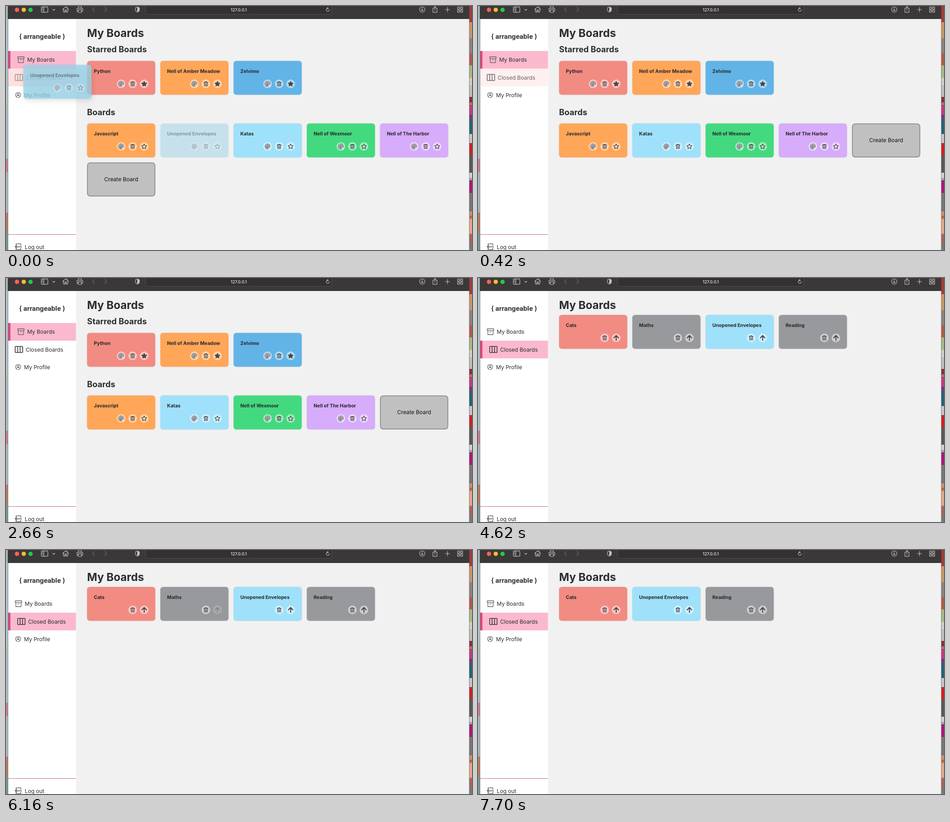
Recreate the animation shown at these times as an HTML page with a canvas. Size 1032 px wide and 543 px high, loop 8000 ms.

```html
<!DOCTYPE html>
<html lang="en">
<head>
<meta charset="utf-8">
<title>Boards</title>
<style>
html, body { margin: 0; width: 100%; height: 100%; overflow: hidden; }
canvas { display: block; width: 100vw; height: 100vh; }
</style>
</head>
<body>
<canvas id="stage" width="1032" height="543"></canvas>
<script>
const ctx = document.getElementById('stage').getContext('2d');
const LOOP = 8000;
const CARD_W = 150.9, CARD_H = 75.4, PITCH = 162.2, LEFT = 179.6;
const INK = '#2d2d2f';
const RED = '#f28b82', ORANGE = '#ffa658', BLUE = '#62b4e7', SKY = '#9fe1fa',
      GREEN = '#43d97f', PURPLE = '#d6acfb', GREY = '#98999c';

const starred = [['Python', RED], ['Nell of Amber Meadow', ORANGE], ['Zelvimo', BLUE]];
const moved = ['Unopened Envelopes', SKY];
const others = [['Katas', SKY], ['Nell of Wexmoor', GREEN], ['Nell of The Harbor', PURPLE]];
const boards = [['Javascript', ORANGE], ...others];
const boardsBefore = [['Javascript', ORANGE], moved, ...others];
const closedAfter = [['Cats', RED], moved, ['Reading', GREY]];
const closed = [['Cats', RED], ['Maths', GREY], moved, ['Reading', GREY]];

// Icons live on a 24 unit grid.
const icons = {
  trash: 'M3 6H21M8 6V3H16V6M5 6L6 21H18L19 6M10 11V17M14 11V17',
  star: 'M12 2L15.1 8.3L22 9.3L17 14.1L18.2 21L12 17.8L5.8 21L7 14.1L2 9.3L8.9 8.3Z',
  arrow: 'M12 21V4M4 12L12 3.5L20 12',
  archive: 'M1 2H23V8H1ZM3 8V22H21V8M9.5 12.5H14.5',
  columns: 'M2 3H22Q23 3 23 4V20Q23 21 22 21H2Q1 21 1 20V4Q1 3 2 3ZM8.4 3V21M15.6 3V21',
  logout: 'M20 8V4Q20 2 18 2H6Q4 2 4 4V7M4 17V20Q4 22 6 22H18Q20 22 20 20V16M23 12H1M7 7L1 12L7 17',
  sidebar: 'M3 3H21Q23 3 23 5V19Q23 21 21 21H3Q1 21 1 19V5Q1 3 3 3ZM9 3V21M4 7H6M4 10.5H6M4 14H6',
  home: 'M1 12L12 2L23 12M4 10V22H20V10M9.5 22V14H14.5V22M18 3V7',
  printer: 'M6 8V2H18V8M6 18H2V8H22V18H18M6 13H18V22H6Z',
  shield: 'M12 2L20 5V12Q20 19 12 22Q4 19 4 12V5Z',
  halfShield: 'M12 2L20 5V12Q20 19 12 22Z',
  back: 'M16 3L7 12L16 21',
  forward: 'M8 3L17 12L8 21',
  down: 'M4 8L12 16L20 8',
  download: 'M23 12A11 11 0 1 1 1 12A11 11 0 1 1 23 12M12 6V17M7.5 13L12 17.5L16.5 13',
  share: 'M8 8H4V23H20V8H16M12 15V1M8 5L12 1L16 5',
  plus: 'M12 2V22M2 12H22',
  grid: 'M2 2H10V10H2ZM14 2H22V10H14ZM2 14H10V22H2ZM14 14H22V22H14Z',
  reload: 'M20 12A8 8 0 1 1 14 4.2M10 1L14.5 4.5L11 9'
};
for (const name in icons) icons[name] = new Path2D(icons[name]);

function rect(x, y, w, h, color) {
  ctx.fillStyle = color;
  ctx.fillRect(x, y, w, h);
}

function rounded(x, y, w, h, r, color) {
  ctx.beginPath();
  ctx.roundRect(x, y, w, h, r);
  ctx.fillStyle = color;
  ctx.fill();
}

function dot(x, y, r, color) {
  ctx.beginPath();
  ctx.arc(x, y, r, 0, Math.PI * 2);
  ctx.fillStyle = color;
  ctx.fill();
}

function text(str, x, y, size, weight = 400, color = INK, align = 'left', family = 'Inter') {
  ctx.font = `${weight} ${size}px ${family}, sans-serif`;
  ctx.textAlign = align;
  ctx.fillStyle = color;
  ctx.fillText(str, x, y);
}

function icon(name, x, y, size, color, line = 1.2, filled = false) {
  const k = size / 24;
  ctx.save();
  ctx.translate(x - size / 2, y - size / 2);
  ctx.scale(k, k);
  ctx.lineWidth = line / k;
  ctx.lineCap = ctx.lineJoin = 'round';
  ctx.strokeStyle = ctx.fillStyle = color;
  if (filled) ctx.fill(icons[name]);
  ctx.stroke(icons[name]);
  ctx.restore();
}

function withAlpha(alpha, draw) {
  ctx.save();
  ctx.globalAlpha *= alpha;
  draw();
  ctx.restore();
}

function palette(x, y, background) {
  dot(x, y, 6.5, '#8d8d90');
  dot(x + 4, y + 4, 2.6, background);
  for (let i = 0; i < 4; i++) {
    const a = Math.PI * (0.95 + i * 0.32);
    dot(x + 3.8 * Math.cos(a), y + 3.8 * Math.sin(a), 1.05, '#d5d5d5');
  }
}

function disc(x, y) {
  dot(x, y, 9.6, 'rgba(255,255,255,.5)');
}

function cardBase(x, y, [title, color]) {
  ctx.save();
  ctx.shadowColor = 'rgba(0,0,0,.18)';
  ctx.shadowBlur = 2;
  rounded(x, y, CARD_W, CARD_H, 6, color);
  ctx.restore();
  text(title, x + 15, y + 26.5, 10.56, 700, '#28282a');
  disc(x + 100.9, y + 51);
  icon('trash', x + 100.9, y + 51, 12.5, '#454548', 1.25);
}

function boardCard(x, y, board, isStarred) {
  cardBase(x, y, board);
  disc(x + 75.3, y + 51);
  palette(x + 75.3, y + 51, 'rgba(255,255,255,.55)');
  disc(x + 126.4, y + 51);
  icon('star', x + 126.4, y + 51, 13.5, '#48484b', 1.3, isStarred);
}

function closedCard(x, y, board, buttonAlpha) {
  cardBase(x, y, board);
  withAlpha(buttonAlpha, () => {
    disc(x + 126.4, y + 51);
    icon('arrow', x + 126.4, y + 51, 15, '#414144', 2.1);
  });
}

function createCard(x, y) {
  ctx.beginPath();
  ctx.roundRect(x + .75, y + .75, CARD_W - 1.5, CARD_H - 1.5, 6);
  ctx.fillStyle = '#c0c0c0';
  ctx.fill();
  ctx.lineWidth = 1.5;
  ctx.strokeStyle = '#7f7f7f';
  ctx.stroke();
  text('Create Board', x + CARD_W / 2, y + 41.8, 12.07, 400, '#111', 'center');
}

const slot = i => LEFT + (i % 5) * PITCH;

function desktop() {
  const strips = (x, w, bands) => bands.forEach(([y, color]) => rect(x, y, w, 543 - y, color));
  strips(0, 5, [[0, '#a9b4b5'], [28, '#b2c4c8'], [218, '#d9b878'], [222, '#afc0c4'],
    [340, '#c87f91'], [370, '#a9b9bd'], [460, '#b67a60'], [503, '#789692']]);
  strips(1026, 6, [[0, '#a33c37'], [36, '#c79a65'], [72, '#8d8580'], [105, '#b55a4c'],
    [132, '#a4bd84'], [160, '#d0cfcb'], [202, '#82333d'], [222, '#c53887'],
    [242, '#7a357a'], [252, '#285f78'], [285, '#c5c8ca'], [305, '#cf2020'],
    [333, '#59565b'], [371, '#d5d3d5'], [388, '#ab1778'], [416, '#77777b'],
    [457, '#d29068'], [475, '#e5a989'], [507, '#a8665c'], [530, '#747c7b']]);
  for (let y = 178; y < 200; y += 4) rect(1026, y, 6, 1, '#8f8e8e');
  text('p', 1027, 220, 9, 400, '#eee');
  text('p', 1027, 388, 9, 400, '#555');
  text('s', 1027, 472, 9, 400, '#333');
  rect(4, 0, 1, 543, '#77858a');
  rect(1025.5, 0, 1, 543, '#626064');
}

function browserBar() {
  rect(4, 0, 1022, 28.5, '#3b3839');
  rect(4, 27.5, 1022, 1, '#2b292a');
  ['#ff5f57', '#febc2e', '#28c840'].forEach((c, i) => dot(24.3 + 15 * i, 8.5, 4.8, c));
  const light = '#c5c3c4', dim = '#68656a';
  icon('sidebar', 85.5, 8, 15.5, light);
  icon('down', 105.8, 8.5, 6.5, light, 1.3);
  icon('home', 132, 7.5, 14, light);
  icon('printer', 163.5, 8, 15, light);
  icon('back', 194, 8, 12, dim, 1.3);
  icon('forward', 220.5, 8, 12, dim, 1.3);
  icon('shield', 291, 8, 13.5, light, 1.1);
  icon('halfShield', 291, 8, 13.5, light, .5, true);
  ctx.beginPath();
  ctx.roundRect(309, -8, 412.5, 26.5, 5);
  ctx.fillStyle = '#343132';
  ctx.fill();
  ctx.lineWidth = 1;
  ctx.strokeStyle = '#535052';
  ctx.stroke();
  text('127.0.0.1', 515.5, 12.2, 9.2, 500, '#f0eff0', 'center');
  icon('reload', 712.8, 8.3, 11, light, 1.1);
  icon('download', 921.8, 8, 13, light, 1.1);
  icon('share', 950, 7.5, 14, light, 1.1);
  icon('plus', 977.7, 8, 11.5, light, 1.2);
  icon('grid', 1005.7, 8, 13.5, light, 1.1);
}

function activeRow(y) {
  rect(5, y, 150, 39.3, '#fbb9ce');
  rect(5, y, 4.8, 39.3, '#d8487d');
}

function sidebar(onClosed, hover) {
  rect(5, 28.5, 150.3, 514.5, '#fff');
  text('{ arrangeable }', 80, 73, 15.5, 700, '#343438', 'center', 'Roboto');
  activeRow(onClosed ? 139.5 : 100.2);
  const a = onClosed ? 0 : 5.4, b = onClosed ? 5.4 : 0;
  icon('archive', 27.6 + a, 119.5, 15.5, '#6c5f65', 1.35);
  text('My Boards', 41.5 + a, 124.3, 12.07);
  if (hover) withAlpha(hover, () => rect(5, 139.5, 150, 39.3, '#ffe1df'));
  withAlpha(1 - hover * .55, () => {
    icon('columns', 28.6 + b, 159, 18, '#343438', 1.6);
    text('Closed Boards', 43.6 + b, 163.6, 12.07);
  });
  ctx.lineWidth = 1.1;
  ctx.strokeStyle = '#5d5d62';
  for (const [y, r, from, to] of [[198, 5.8, 0, 7], [196.7, 2.1, 0, 7], [202.8, 3.8, Math.PI * 1.1, Math.PI * 1.9]]) {
    ctx.beginPath();
    ctx.arc(26.8, y, r, from, to);
    ctx.stroke();
  }
  text('My Profile', 40, 202.8, 12.07);
  rect(5, 508, 150, 1, '#c5647c');
  icon('logout', 27.5, 535.8, 16, '#55555a', 1.4);
  text('Log out', 41.6, 541, 12.07);
}

function openPage(t) {
  const list = t < 420 ? boardsBefore : boards;
  text('Starred Boards', LEFT, 103.4, 18.1, 700);
  starred.forEach((b, i) => boardCard(slot(i), 122.2, b, true));
  text('Boards', LEFT, 242.8, 18.1, 700);
  list.forEach((b, i) => {
    const faded = t < 350 && b === moved;
    withAlpha(faded ? .4 : 1, () => boardCard(slot(i), 261.5, b, false));
  });
  const n = list.length;
  createCard(slot(n), 261.5 + Math.floor(n / 5) * 86.8);
}

const clamp = v => Math.max(0, Math.min(1, v));

function closedPage(t) {
  const list = t < 6930 ? closed : closedAfter;
  let dim = clamp((t - 6020) / 140);
  if (t >= 6930) dim = clamp((t - 6860) / 350) * (1 - clamp((t - 7350) / 350));
  list.forEach((b, i) => closedCard(slot(i), 82.2, b, i === 1 ? 1 - .65 * dim : 1));
}

function ghost(alpha) {
  withAlpha(alpha, () => {
    ctx.save();
    ctx.shadowColor = 'rgba(0,0,0,.2)';
    ctx.shadowBlur = 12;
    ctx.shadowOffsetX = 2;
    ctx.shadowOffsetY = 5;
    rounded(38.6, 131, CARD_W, CARD_H, 6, SKY);
    ctx.restore();
    boardCard(38.6, 131, moved, false);
  });
}

function draw(time) {
  const t = Math.floor((time % LOOP) / 70) * 70;
  const onClosed = t >= 4620;
  const hover = t < 420 ? 1 : t < 490 ? .5 : 0;
  desktop();
  rect(155, 28.5, 870.5, 514.5, '#f1f1f1');
  sidebar(onClosed, hover);
  browserBar();
  text('My Boards', LEFT, 69.4, 24.15, 700);
  if (onClosed) closedPage(t);
  else openPage(t);
  if (t < 350) ghost(t < 280 ? .5 : .25);
  requestAnimationFrame(now => draw(now - start));
}

const start = performance.now();
draw(0);
</script>
</body>
</html>
```
